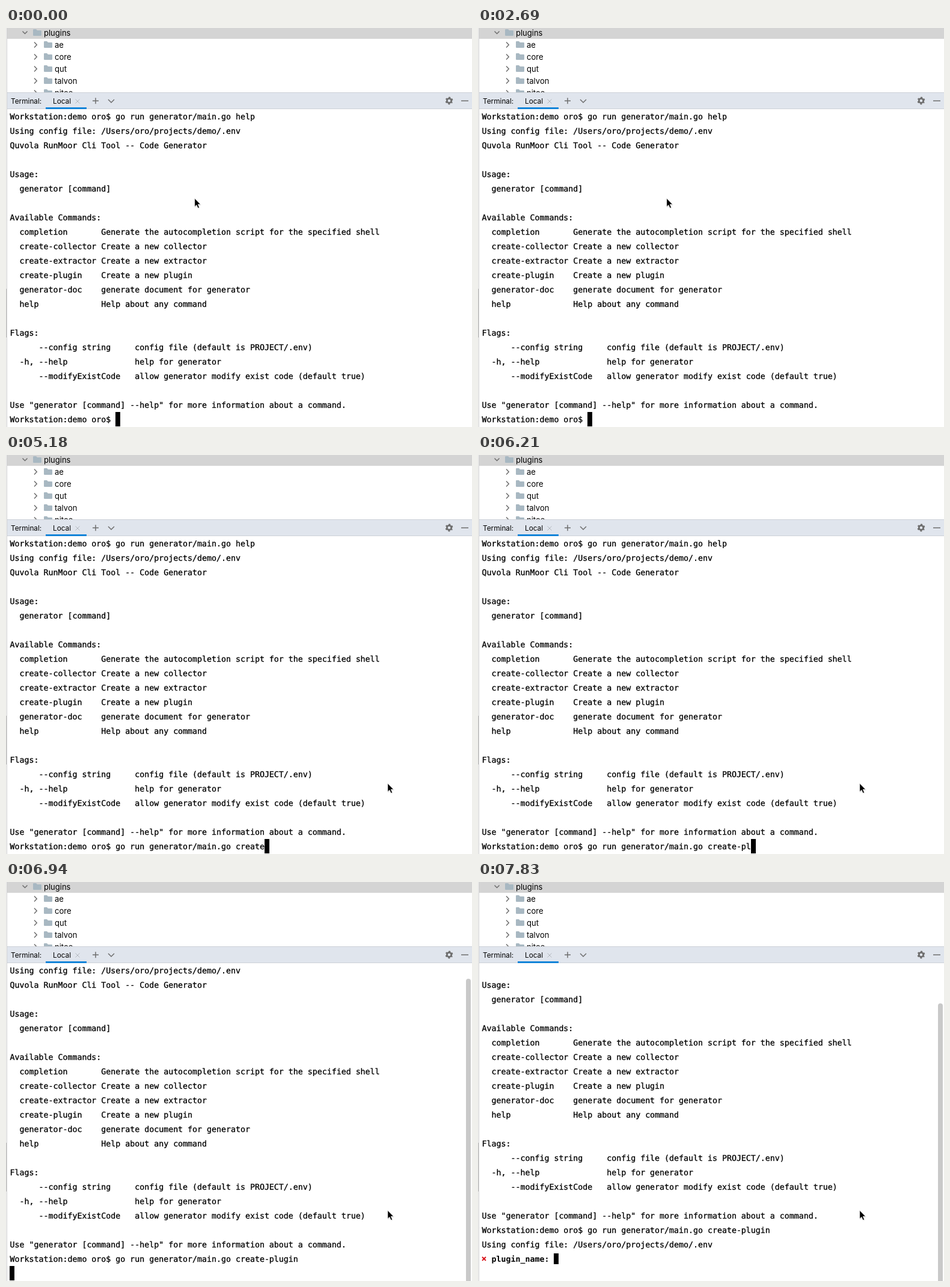
These frames come from a looping animation (775 by 664 pixels, 8 s). An HTML page:

```html
<!DOCTYPE html>
<html lang="en">
<head>
<meta charset="utf-8">
<title>Terminal</title>
<style>
  html, body { margin: 0; width: 775px; height: 664px; overflow: hidden; background: #fff; }
  svg { display: block; }
  text { white-space: pre; }
  .ui { font: 13px Inter, "Open Sans", sans-serif; }
  .tab { font-size: 11.8px; }
  .term { font: 13.288px "DejaVu Sans Mono", monospace; text-rendering: geometricPrecision; font-variant-ligatures: none; }
  .term text { stroke: #000; stroke-width: .3; }
  .term .bold { font-weight: 700; stroke: none; }
  .line { fill: none; stroke: #6e6e6e; stroke-width: 1.5; }
</style>
</head>
<body>
<svg width="775" height="664" viewBox="0 0 775 664">
  <defs>
    <clipPath id="treeClip"><rect width="775" height="107"/></clipPath>
    <clipPath id="termClip"><rect y="135" width="775" height="529"/></clipPath>
    <path id="folder" d="M0 1.2Q0 0 1.2 0H5L7 2H12.8Q14 2 14 3.2V9.8Q14 11 12.8 11H1.2Q0 11 0 9.8Z" fill="#a8b8c2"/>
  </defs>
  <rect width="775" height="664" fill="#fff"/>

  <g class="ui" id="tree" clip-path="url(#treeClip)">
    <rect x="2" width="773" height="18" fill="#d4d4d4"/>
    <path class="line" d="M27.5 5.5L31.5 9.5L35.5 5.5"/>
    <use href="#folder" x="45" y="2"/>
    <text x="63" y="13">plugins</text>
  </g>

  <g class="ui tab">
    <rect x="2" y="107" width="773" height="28" fill="#e0e5ed"/>
    <path d="M2 107.5H775M2 134.5H775" stroke="#cdd1d8"/>
    <text x="8" y="126">Terminal:</text>
    <text x="78" y="126">Local</text>
    <rect x="66" y="132" width="68" height="3" fill="#1384d8"/>
    <path d="M115.5 118.5l7 7m0-7l-7 7" stroke="#b3b8bf" fill="none"/>
    <path class="line" d="M144 121.2h10M149 116.2v10M170 119l5 5l5-5M757 121.2h12"/>
    <g transform="translate(737 121)" fill="none" stroke="#6e6e6e">
      <circle r="3.7" stroke-width="2.8"/>
      <circle r="5.4" stroke-width="2" stroke-dasharray="2.8 2.855" stroke-dashoffset="1.4" transform="rotate(30)"/>
    </g>
  </g>

  <rect width="1" height="664" fill="#f4f4f4"/>
  <rect x="1" width="1" height="664" fill="#d1d1d1"/>
  <rect y="434" width="1" height="81" fill="#bdbdbd"/>

  <g class="term" clip-path="url(#termClip)">
    <g id="rows"></g>
    <rect id="caret" width="8"/>
  </g>
  <path id="bar" fill="#c9c9c9"/>
  <g id="mouse">
    <path d="M1 2V16L4.2 13L6.3 18L9 16.8L7 12H11.5Z" fill="#000" opacity=".18"/>
    <path d="M.5 .6V14.9L3.7 12L5.9 17.1L8.4 16L6.2 11H10.7Z" fill="#000" stroke="#fff" stroke-width=".9"/>
  </g>
</svg>
<script>
const NS = 'http://www.w3.org/2000/svg';
const LOOP = 8000, LEFT = 6, TOP = 135, CELL = 8, ROW = 24, PROMPT_ROW = 21;
const TEXT_LEFT = LEFT + 0.6;
const el = id => document.getElementById(id);
const add = (parent, tag, attrs, text = '') => {
  const node = document.createElementNS(NS, tag);
  for (const k in attrs) node.setAttribute(k, attrs[k]);
  node.textContent = text;
  return parent.appendChild(node);
};
const set = (node, attrs) => { for (const k in attrs) node.setAttribute(k, attrs[k]); };

['ae', 'core', 'qut', 'talvon', 'nitoe'].forEach((name, i) => {
  const y = 28 + 20 * i;
  add(el('tree'), 'path', { class: 'line', d: `M47 ${y - 4.5}l4.2 4.5l-4.2 4.5` });
  add(el('tree'), 'use', { href: '#folder', x: 63, y: y - 6 });
  add(el('tree'), 'text', { x: 81, y: y + 5 }, name);
});

const prompt = 'Workstation:demo oro$ ';
const config = 'Using config file: /Users/oro/projects/demo/.env';
const lines = [
  prompt + 'go run generator/main.go help',
  config,
  'Quvola RunMoor Cli Tool -- Code Generator',
  '',
  'Usage:',
  '  generator [command]',
  '',
  'Available Commands:',
  '  completion       Generate the autocompletion script for the specified shell',
  '  create-collector Create a new collector',
  '  create-extractor Create a new extractor',
  '  create-plugin    Create a new plugin',
  '  generator-doc    generate document for generator',
  '  help             Help about any command',
  '',
  'Flags:',
  '      --config string     config file (default is PROJECT/.env)',
  '  -h, --help              help for generator',
  '      --modifyExistCode   allow generator modify exist code (default true)',
  '',
  'Use "generator [command] --help" for more information about a command.',
  prompt
];
const baseline = row => TOP + row * ROW + 17;
const rowNodes = lines.map((s, i) => add(el('rows'), 'text', { x: TEXT_LEFT, y: baseline(i) }, s));
const promptNode = rowNodes[PROMPT_ROW];

// Output that follows the submitted command
const answer = add(el('rows'), 'g', {});
add(answer, 'text', { x: TEXT_LEFT, y: baseline(22) }, config);
add(answer, 'path', { d: `M7 ${baseline(23) - 8}l6 6m0-6l-6 6`, stroke: '#d9141b', 'stroke-width': 1.9 });
add(answer, 'text', { x: TEXT_LEFT + 2 * CELL, y: baseline(23), class: 'bold' }, 'plugin_name:');

const command = 'go run generator/main.go create-plugin';
const typed = [[0, 0], [5180, 31], [5770, 32], [5920, 33], [6210, 34], [6360, 35], [6510, 37], [6650, 38]];
const scrolls = [[0, 0], [6940, 1], [7830, 3]];
const blinks = [150, 740, 1190, 1790, 2240, 2690, 3250, 3700, 4300, 4750, 7380, 7830];
const ENTER = 6940, REPLY = 7830;
const stepAt = (steps, t) => steps.filter(s => s[0] <= t).pop()[1];

function render(t) {
  const count = stepAt(typed, t), scroll = stepAt(scrolls, t), reply = t >= REPLY;
  const text = prompt + command.slice(0, count);
  if (promptNode.textContent !== text) promptNode.textContent = text;
  set(el('rows'), { transform: `translate(0 ${-scroll * ROW})` });
  set(answer, { visibility: reply ? 'visible' : 'hidden' });

  const col = reply ? 15 : t >= ENTER ? 0 : prompt.length + count;
  set(el('caret'), {
    x: LEFT + col * CELL,
    y: reply ? 618 : TOP + PROMPT_ROW * ROW,
    height: reply ? 18 : ROW,
    visibility: blinks.filter(b => b <= t).length % 2 ? 'hidden' : 'visible'
  });

  const top = reply ? 202 : 161;
  set(el('bar'), {
    d: `M765 664V${top + 4}a4 4 0 0 1 8 0V664Z`,
    visibility: t >= 6800 ? 'visible' : 'hidden'
  });
  set(el('mouse'), {
    transform: t < 5180 ? 'translate(313.2 282.7)' : 'translate(634.2 545.7)',
    visibility: t >= 4450 && t < 5180 ? 'hidden' : 'visible'
  });
}

const start = performance.now();
function frame() {
  render((performance.now() - start) % LOOP);
  requestAnimationFrame(frame);
}
frame();
</script>
</body>
</html>
```
